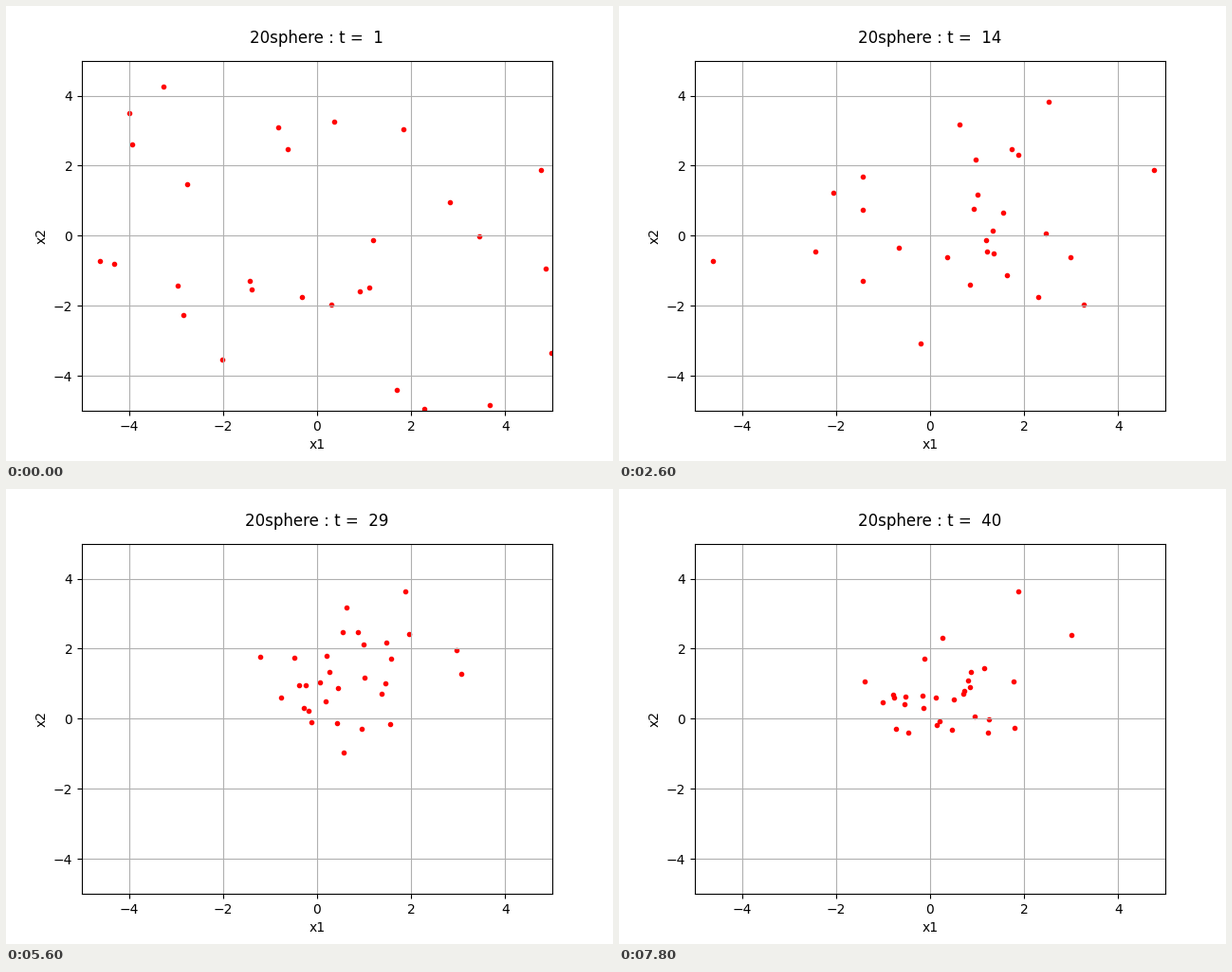
A matplotlib script for the animation above (8 s loop, 640 by 480 pixels).

```python
import numpy as np
import matplotlib.pyplot as plt
from matplotlib.animation import FuncAnimation

W, H, DPI = 640, 480, 100
STEPS, STEP_MS = 40, 200
COV = np.array([[1.0, 0.3], [0.3, 0.8]])

# Starting population; the last two begin outside the axes
START = [(-3.27, 4.26), (-3.99, 3.50), (-3.93, 2.61), (-2.76, 1.47),
         (-4.62, -0.72), (-4.31, -0.80), (-2.96, -1.42), (-2.84, -2.26),
         (-2.02, -3.53), (-1.43, -1.29), (-1.39, -1.53), (-0.32, -1.75),
         (0.30, -1.96), (0.91, -1.59), (1.11, -1.48), (1.19, -0.12),
         (-0.83, 3.10), (-0.63, 2.47), (0.36, 3.26), (1.83, 3.04),
         (2.82, 0.96), (3.45, -0.02), (4.76, 1.88), (4.86, -0.94),
         (4.98, -3.34), (1.70, -4.40), (2.28, -4.94), (3.67, -4.83),
         (6, 0), (6, 0)]


def evolve(start):
    """Population at every step: some members jump, the rest stay put.

    New places gather around a drifting centre in a shrinking cloud,
    and jumps become more frequent as the search goes on.
    """
    rng = np.random.default_rng(20)
    pop = np.array(start, float)
    history = [pop.copy()]
    for progress in np.linspace(0, 1, STEPS)[1:]:
        centre = 0.3 + 0.6 * np.sin(np.pi * progress)
        spread = 2.2 - 1.3 * progress
        jumps = rng.random(len(pop)) < 0.12 + 0.17 * progress
        places = rng.multivariate_normal([centre, centre], spread**2 * COV,
                                         size=len(pop))
        pop[jumps] = places[jumps]
        history.append(pop.copy())
    return history


history = evolve(START)

fig, ax = plt.subplots(figsize=(W / DPI, H / DPI), dpi=DPI)
ax.set(xlim=(-5, 5), ylim=(-5, 5), xlabel="x1", ylabel="x2")
ax.grid(True)
# Just left of the middle, so that half pixels round down
title = ax.text(0.4995, 1.05, "", ha="center", size="large",
                transform=ax.transAxes)
dots = ax.scatter(*history[0].T, c="red", marker=".")


def update(step):
    dots.set_offsets(history[step])
    title.set_text(f"20sphere : t =  {step + 1}")
    return dots, title


anim = FuncAnimation(fig, update, frames=STEPS, interval=STEP_MS,
                     repeat=True, repeat_delay=0)
plt.show()
```
